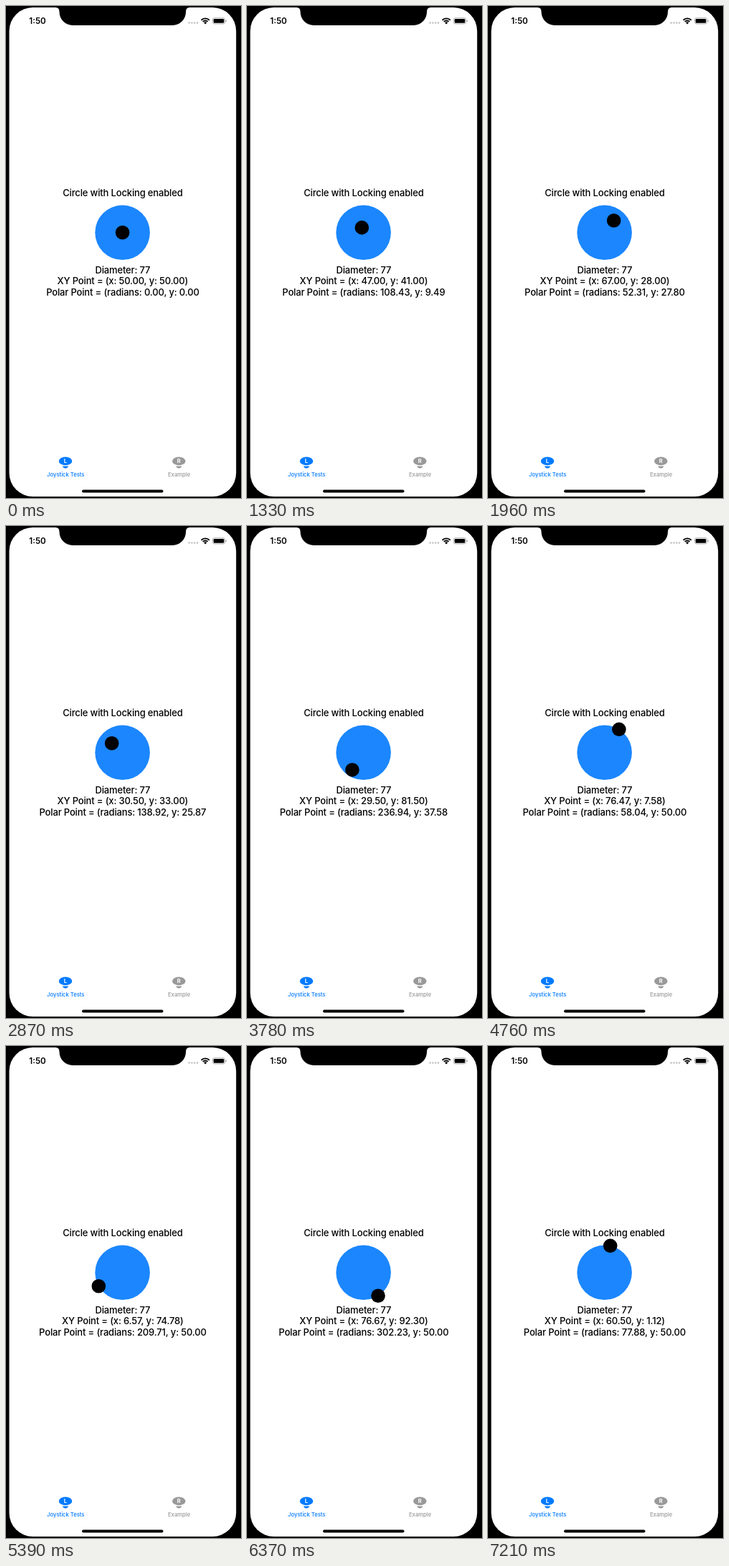
An HTML page with a canvas for the animation above (8750 ms loop, 328 by 688 pixels).

```html
<!DOCTYPE html>
<html lang="en">
<head>
<meta charset="utf-8">
<title>Joystick Tests</title>
<style>
  html, body { margin: 0; width: 100%; height: 100%; overflow: hidden; background: #000; }
  canvas { display: block; width: 328px; height: 688px; }
</style>
</head>
<body>
<canvas id="stage"></canvas>
<script>
const W = 328, H = 688, LOOP = 8750, STEP = 70;
const BLUE = '#1b86fe', TINT = '#007aff', GRAY = '#999999';
const PAD = { x: 162.6, y: 316.8, r: 38.3 };
const MID = 162.9;

// Thumb path: [ms, degrees, radius]; a radius of 50 is locked to the rim
const path = [
  [0, 108.43, 0], [980, 108.43, 0], [1050, 108.43, 1.58], [1120, 108.43, 1.58],
  [1540, 108, 17], [1960, 52.31, 27.8], [2520, 52.31, 27.8],
  [2730, 95, 22], [2870, 138.92, 25.87], [3290, 194, 30], [3430, 194, 30],
  [3780, 236.94, 37.58], [4060, 284, 50], [4340, 349, 50],
  [4760, 418.04, 50], [5250, 530, 50], [5740, 669, 50], [6300, 669, 50],
  [6370, 662.23, 50], [6440, 662.23, 50], [7210, 797.876, 50], [LOOP, 797.876, 50]
];

const canvas = document.getElementById('stage');
const ctx = canvas.getContext('2d');
const scale = window.devicePixelRatio || 1;
canvas.width = W * scale;
canvas.height = H * scale;

function thumbAt(ms) {
  const i = Math.max(1, path.findIndex(k => k[0] >= ms));
  const [t0, a0, r0] = path[i - 1], [t1, a1, r1] = path[i];
  const p = (ms - t0) / (t1 - t0);
  let angle = (a0 + (a1 - a0) * p) % 360;
  let radius = r0 + (r1 - r0) * p;
  const rad = angle * Math.PI / 180;
  let x = 50 + radius * Math.cos(rad), y = 50 - radius * Math.sin(rad);
  if (radius < 49.99) {
    // Free drags land on half points
    x = Math.round(x * 2) / 2;
    y = Math.round(y * 2) / 2;
    angle = (Math.atan2(50 - y, x - 50) * 180 / Math.PI + 360) % 360;
    radius = Math.hypot(x - 50, y - 50);
  }
  return { x, y, angle, radius };
}

function disc(x, y, r, color) {
  ctx.fillStyle = color;
  ctx.beginPath();
  ctx.arc(x, y, r, 0, Math.PI * 2);
  ctx.fill();
}

function box(x, y, w, h, r, color) {
  ctx.fillStyle = color;
  ctx.beginPath();
  ctx.roundRect(x, y, w, h, r);
  ctx.fill();
}

function label(str, x, y, size, weight, color, spacing = 0) {
  ctx.font = `${weight} ${size}px Inter, Roboto, sans-serif`;
  ctx.letterSpacing = spacing + 'px';
  ctx.textAlign = 'center';
  ctx.fillStyle = color;
  ctx.fillText(str, x, y);
}

const line = (str, y) => label(str, MID, y, 13, 500, '#000', -0.16);

function notch() {
  ctx.fillStyle = '#000';
  ctx.beginPath();
  ctx.moveTo(69, 0);
  ctx.lineTo(69, 2);
  ctx.quadraticCurveTo(74.5, 2, 74.5, 8);
  ctx.arcTo(74.5, 27, 94, 27, 18.5);
  ctx.arcTo(251, 27, 251, 8, 18.5);
  ctx.lineTo(251, 8);
  ctx.quadraticCurveTo(251, 2, 256.5, 2);
  ctx.lineTo(256.5, 0);
  ctx.fill();
}

function wifi(x, y) {
  const a = -Math.PI * 0.75, b = -Math.PI * 0.25;
  ctx.strokeStyle = '#000';
  ctx.lineWidth = 1.8;
  for (const r of [4.9, 8]) {
    ctx.beginPath();
    ctx.arc(x, y, r, a, b);
    ctx.stroke();
  }
  ctx.fillStyle = '#000';
  ctx.beginPath();
  ctx.moveTo(x, y);
  ctx.arc(x, y, 3, a, b);
  ctx.fill();
}

function statusBar() {
  label('1:50', 44, 25, 11.6, 600, '#000');
  for (let i = 0; i < 4; i++) disc(255.6 + i * 3.8, 23.6, 1.3, '#c4c4c4');
  wifi(278.2, 25.4);
  ctx.strokeStyle = '#a0a0a0';
  ctx.lineWidth = 0.8;
  ctx.beginPath();
  ctx.roundRect(288.4, 16.6, 17.2, 8.4, 2.4);
  ctx.stroke();
  box(289.7, 17.9, 14.6, 5.8, 1.3, '#000');
  box(306.6, 19.3, 1.2, 3, 0.6, '#a0a0a0');
}

function tab(x, letter, name, color) {
  ctx.fillStyle = color;
  ctx.beginPath();
  ctx.ellipse(x, 636.4, 9.2, 5.8, 0, 0, Math.PI * 2);
  ctx.fill();
  ctx.beginPath();
  ctx.moveTo(x - 4, 643.2);
  ctx.quadraticCurveTo(x, 644, x + 4, 643.2);
  ctx.quadraticCurveTo(x + 3, 646.4, x, 646.4);
  ctx.quadraticCurveTo(x - 3, 646.4, x - 4, 643.2);
  ctx.fill();
  label(letter, x, 639.2, 7.6, 700, '#fff');
  label(name, x + 0.3, 657.6, 7.66, 500, color);
}

function draw(ms) {
  const t = thumbAt(ms);
  ctx.setTransform(scale, 0, 0, scale, 0, 0);
  ctx.fillStyle = '#000';
  ctx.fillRect(0, 0, W, H);
  box(4.5, 2, 316.7, 684, 33, '#fff');
  notch();
  statusBar();

  line('Circle with Locking enabled', 266);
  disc(PAD.x, PAD.y, PAD.r, BLUE);
  const unit = PAD.r / 50;
  disc(PAD.x + (t.x - 50) * unit, PAD.y + (t.y - 50) * unit, 9.8, '#000');
  line('Diameter: 77', 373.6);
  line(`XY Point = (x: ${t.x.toFixed(2)}, y: ${t.y.toFixed(2)})`, 389.2);
  line(`Polar Point = (radians: ${t.angle.toFixed(2)}, y: ${t.radius.toFixed(2)}`, 404.8);

  tab(83, 'L', 'Joystick Tests', TINT);
  tab(241.3, 'R', 'Example', GRAY);
  box(106, 676.4, 113.5, 4, 2, '#000');
}

const start = performance.now();
function tick() {
  const ms = (performance.now() - start) % LOOP;
  draw(Math.floor(ms / STEP) * STEP);
  requestAnimationFrame(tick);
}
tick();
</script>
</body>
</html>
```
